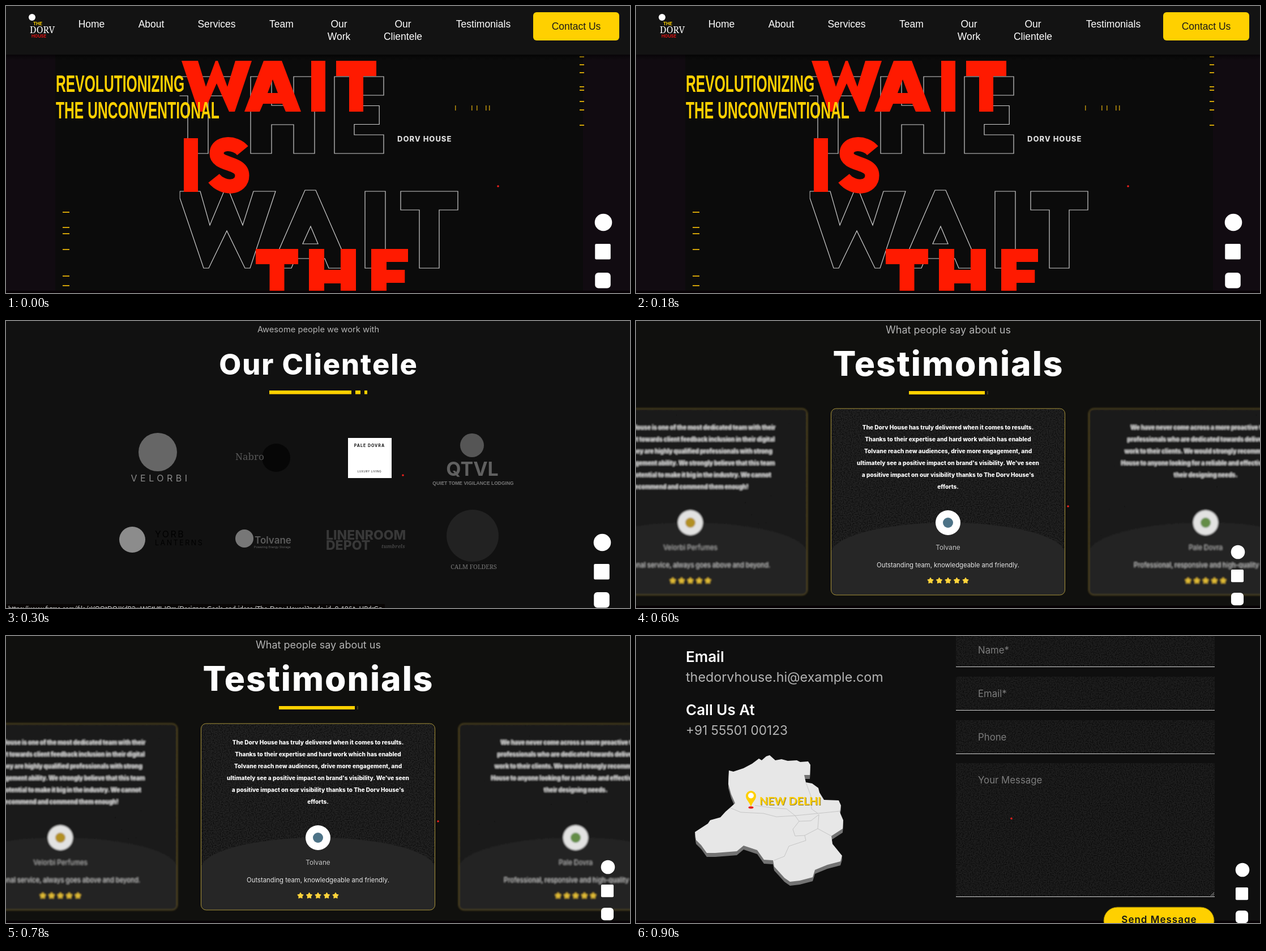
These frames come from a looping animation (1102x508 px, 1.2 s). An HTML page:

```html
<!DOCTYPE html>
<html lang="en">
<head>
<meta charset="utf-8">
<title>Agency website tour</title>
<style>
  html, body { margin: 0; width: 100%; height: 100%; overflow: hidden; background: #111; }
  svg { display: block; width: 100vw; height: 100vh; }
  text { font-family: Inter, "Open Sans", sans-serif; fill: #fff; white-space: pre; }
  .m { text-anchor: middle; }
  .sb { font-weight: 600; }
  .b { font-weight: 700; }
  .xb { font-weight: 800; }
  .arial { font-family: "Liberation Sans", Arial, sans-serif; }
  .serif { font-family: "Noto Serif", serif; }
  .lato { font-family: Lato, sans-serif; }
  .gold { fill: #ffd000; }
  .grey { fill: #b4b4b4; }
  .hint { fill: #7c7c7c; }
</style>
</head>
<body>
<svg id="stage" viewBox="0 0 1102 508" preserveAspectRatio="none"></svg>
<script>
const YELLOW = '#ffd000', RED = '#ff1a00';

const rect = (x, y, w, h, fill, more = '') =>
  `<rect x="${x}" y="${y}" width="${w}" height="${h}" fill="${fill}" ${more}/>`;
const circle = (x, y, r, fill) => `<circle cx="${x}" cy="${y}" r="${r}" fill="${fill}"/>`;
const text = (x, y, size, str, cls = '', more = '') =>
  `<text x="${x}" y="${y}" font-size="${size}" class="${cls}" ${more}>${str}</text>`;
const color = c => `style="fill:${c}"`;
const spaced = (px, c = '#fff') => `style="fill:${c};letter-spacing:${px}px"`;
const cursor = (x, y) => circle(x, y, 1.8, '#f0201c');
const page = fill => rect(0, 0, 1102, 508, fill);
const floor = () => rect(0, 504, 1102, 4, '#060004');

// Social buttons: one circle, two squares
const social = (x, y, r, a, b) => {
  const s = r * 1.8;
  return circle(x, y, r, '#fff') +
    [a, b].map((top, i) => rect(x - s / 2 - 1, top, s, s, '#fff', `rx="${2 + i * 4}"`)).join('');
};

// Block letters as path data
const barT = (x, y, w, h, bar, s) =>
  `M${x} ${y}h${w}v${bar}h${-(w - s) / 2}v${h - bar}h${-s}v${bar - h}h${-(w - s) / 2}z`;
const barI = (x, y, w, h) => `M${x} ${y}h${w}v${h}h${-w}z`;
const barH = (x, y, w, h, s, top, bottom) => {
  const gap = w - 2 * s;
  return `M${x} ${y}h${s}v${top}h${gap}v${-top}h${s}v${h}h${-s}v${bottom - h}h${-gap}v${h - bottom}h${-s}z`;
};
const barE = (x, y, w, h, s, bar) => {
  const gap = (h - 3 * bar) / 2, arm = w - s;
  return `M${x} ${y}h${w}v${bar}h${-arm}v${gap}h${arm * .85}v${bar}h${-arm * .85}v${gap}h${arm}v${bar}h${-w}z`;
};

function hero() {
  const nav = [[151, 'Home'], [256.5, 'About'], [372, 'Services'], [486.5, 'Team'],
    [588, 'Our', 'Work'], [701, 'Our', 'Clientele'], [843, 'Testimonials']];
  const outline = barT(275, 125, 128, 136, 34, 36) + barH(432, 125, 113, 136, 37, 51, 85) +
    barE(580, 125, 87, 136, 35, 33) +
    'M307 328H343L360 388 385 328H394L418 388 437 328H476L431 464H422L390 398 358 464H349L307 340z' +
    'M528 326H547L607 464H570L563 447H511L504 464H468zM538 390L551 421H524z' +
    barI(634, 328, 36, 136) + barT(697, 328, 101, 136, 33, 35);
  const solid = 'M310 97H339L353 143 370 97H374L391 143 405 97H434L404 187H394L372 137 350 187H340z' +
    'M455 97H487L521 187H494L488 173H454L448 187H421zM471 130L480 154H462z' +
    barI(539, 97, 25, 90) + barT(583, 97, 71, 90, 27, 25) + barI(314, 234, 25, 95) +
    barT(441, 430, 75, 95, 27, 26) + barH(535, 430, 83, 95, 27, 37, 61) + barE(645, 430, 65, 97, 27, 23);
  const ticks = (list, x, w) => list.map(y => rect(x, y - 1, w, 2, '#d0a208')).join('');
  return page('#110b11') + rect(87, 86, 932, 422, '#0b0b0b') +
    `<clipPath id="left"><rect x="306.5" y="90" width="700" height="418"/></clipPath>
     <path d="${outline}" fill="none" stroke="#cfcfcf" stroke-width="1.2" clip-path="url(#left)"/>
     <path d="${solid}" fill="${RED}" fill-rule="evenodd"/>
     <path d="M418 256C405 240 372 240 372 261C372 283 417 275 417 300C417 323 384 326 367 305"
       fill="none" stroke="${RED}" stroke-width="25"/>` +
    ticks([90, 104, 118, 143, 149, 169, 184, 211], 1013, 8) +
    ticks([365, 392, 403, 431, 478, 495], 100, 12) +
    [793, 822, 831, 847, 853].map(x => rect(x, 176, 1.5, 9, '#b8900c')).join('') +
    text(691, 240, 13, 'DORV HOUSE', 'xb', spaced(1, '#ddd')) +
    ['REVOLUTIONIZING', 'THE UNCONVENTIONAL'].map((s, i) =>
      text(0, 0, 42, s, 'arial b gold', `transform="translate(88 ${152 + i * 46.5}) scale(.587 1)"`)).join('') +
    rect(0, 84, 1102, 12, 'url(#shade)') + rect(0, 0, 1102, 86, '#131313') +
    circle(46, 20, 6, '#fff') + text(48, 34, 8, 'THE', 'b gold') +
    text(42, 48, 16, 'DORV', 'serif') + text(45, 56, 7.5, 'HOUSE', 'b', color('#e01010')) +
    nav.map(([x, ...lines]) => lines.map((s, i) =>
      text(x, 38 + i * 22, 17.5, s, 'arial m')).join('')).join('') +
    rect(931, 11, 152, 50, YELLOW, 'rx="6"') +
    text(1007, 42, 17.5, 'Contact Us', 'arial m', color('#1a1a1a')) +
    floor() + social(1055, 383, 15.3, 421, 472) + cursor(869, 319);
}

function clients() {
  return page('#111') +
    text(551.5, 20, 14.7, 'Awesome people we work with', 'm grey') +
    text(552, 94.5, 50.5, 'Our Clientele', 'xb m', spaced(2)) +
    rect(465, 123, 145, 6.5, YELLOW) + rect(617, 123, 9, 6.5, YELLOW) + rect(633, 123, 5, 6.5, YELLOW) +
    circle(268, 232, 34, '#666') + text(273, 284, 16, 'VELORBI', 'm', spaced(5.5, '#8a8a8a')) +
    circle(477, 242, 25, '#060606') + text(405, 246, 17, 'Nabro', 'serif', color('#555')) +
    rect(604, 207, 77, 71, '#fff') +
    text(642, 223, 7, 'PALE DOVRA', 'b m', spaced(1, '#111')) +
    text(642, 268, 4.6, 'LUXURY LIVING', 'm', spaced(.6, '#111')) +
    circle(823, 220, 21, '#555') + text(823.5, 274, 34, 'QTVL', 'b m', color('#606060')) +
    text(825, 290, 8.5, 'QUIET TOME VIGILANCE LODGING', 'arial b m', color('#777')) +
    circle(223, 387, 23, '#8c8c8c') +
    text(263, 383, 16, 'YORB', '', spaced(2.5, '#000')) +
    text(263, 397, 12.5, 'LANTERNS', '', spaced(2.5, '#000')) +
    circle(421, 385, 16, '#777') + text(439, 394, 17, 'Tolvane', 'sb', color('#5c5c5c')) +
    text(438, 402, 5.4, 'Powering Energy Storage', '', color('#666')) +
    text(565, 387, 23, 'LINENROOM', 'xb', color('#383838')) +
    text(565, 405, 23, 'DEPOT', 'xb', color('#383838')) +
    text(663, 402, 9, 'tumbrels', 'serif b', 'style="fill:#444;font-style:italic"') +
    circle(824, 380, 46, '#222') +
    text(826, 439, 10.7, 'CALM FOLDERS', 'serif m', color('#777')) +
    rect(0, 501, 669, 7, '#080504') +
    text(4, 513, 11.4, 'https://www.figma.com/file/aYOQtDOJKdR3wWGtVfLJQm/Designer-Goals-and-ideas-(The-Dorv-House)?node-id=0-10&amp;t=HRdrGq', 'lato', color('#ddd')) +
    social(1053, 392, 15.3, 430, 480) + cursor(701, 273);
}

const star = x => {
  let d = '';
  for (let i = 0; i < 10; i++) {
    const a = i * Math.PI / 5, r = i % 2 ? 2.9 : 5.2;
    d += `${x + r * Math.sin(a)},${459.8 - r * Math.cos(a)} `;
  }
  return `<polygon points="${d}" fill="#ffd43b" stroke="#ffd43b" stroke-width="1.2" stroke-linejoin="round"/>`;
};

function card(cx, lines, logo, name, quote, border, more = '') {
  const x = cx - 206.5;
  return `<g ${more}>` + rect(x, 155, 413, 330, '#232323', 'rx="9" filter="url(#leather)"') +
    `<path d="M${x} 412a206.5 55 0 0 1 413 0V476a9 9 0 0 1 -9 9H${x + 9}a9 9 0 0 1 -9 -9z" fill="#262626"/>` +
    rect(x, 155, 413, 330, 'none', `rx="9" stroke="${border}"`) +
    lines.map((s, i) => text(cx, 192 + i * 21, 10.1, s, 'xb m')).join('') +
    circle(cx, 357, 22, '#fff') + circle(cx, 357, 9, logo) +
    text(cx, 404.5, 11.7, name, 'm', color('#c4c4c4')) +
    text(cx, 435.5, 11.3, quote, 'm', color('#e6e6e6')) +
    [-31, -15.5, 0, 15.5, 31].map(d => star(cx + d)).join('') + '</g>';
}

function testimonials() {
  const away = ['#8a7428', 'filter="url(#soft)" opacity=".88"'];
  return page('#10100e') +
    text(551.5, 22, 18, 'What people say about us', 'm grey') +
    text(551.5, 97, 60.5, 'Testimonials', 'xb m', spaced(2)) +
    rect(482, 124, 134, 6, YELLOW) + rect(620.5, 124, 1, 6, '#776a2a') +
    card(96, ['The Dorv House is one of the most dedicated team with their',
      'great effort towards client feedback inclusion in their digital',
      'media. They are highly qualified professionals with strong',
      'time management ability. We strongly believe that this team',
      'has the potential to make it big in the industry. We cannot',
      'recommend and commend them enough!'],
      '#c9a227', 'Velorbi Perfumes', 'Exceptional service, always goes above and beyond.', ...away) +
    card(1006, ['We have never come across a more proactive team of',
      'professionals who are dedicated towards delivering top',
      'work to their clients. We would strongly recommend Dorv',
      'House to anyone looking for a reliable and effective team for',
      'their designing needs.'],
      '#6f9f4f', 'Pale Dovra', 'Professional, responsive and high-quality work.', ...away) +
    card(551, ['The Dorv House has truly delivered when it comes to results.',
      'Thanks to their expertise and hard work which has enabled',
      'Tolvane reach new audiences, drive more engagement, and',
      "ultimately see a positive impact on brand's visibility. We've seen",
      "a positive impact on our visibility thanks to The Dorv House's",
      'efforts.'],
      '#4d7387', 'Tolvane', 'Outstanding team, knowledgeable and friendly.', '#a8933a') +
    floor() + social(1063, 409, 12.3, 440, 481) + cursor(763, 328);
}

function contact() {
  const land = 'M164 238L172 240 190 234 205 226 217 217 222 220 230 213 236 211 246 220 257 218 268 221 ' +
    '284 220 290 223 304 222 308 228 307 246 297 246 300 259 311 261 322 269 324 277 332 290 358 291 362 300 ' +
    '360 312 366 326 365 341 345 354 347 368 364 389 361 399 338 405 316 414 312 427 289 433 272 435 262 428 ' +
    '244 408 242 397 226 396 214 379 190 371 178 381 140 384 125 384 115 370 106 361 104 347 127 332 131 326 ' +
    '149 321 158 311 166 304 175 296 168 280 163 262z';
  const fields = [[-5, 60, 'Name*'], [72, 60, 'Email*'], [149, 60, 'Phone'], [225, 237, 'Your Message']];
  return page('#0f0f0f') +
    text(88, 46, 26, 'Email', 'sb') + text(88, 81, 23.3, 'thedorvhouse.hi@example.com', 'grey') +
    text(88, 140, 26, 'Call Us At', 'sb') + text(88, 175, 22.6, '+91 55501 00123', 'grey') +
    [7, 5, 3].map(y => `<path d="${land}" transform="translate(0 ${y})" fill="#737373"/>`).join('') +
    `<path d="${land}" fill="#e7e7e7"/>
     <path d="M166 304L185 312 225 314 248 320 281 318 321 314 360 310M210 300L240 304 266 306 281 318
       288 328 277 342 281 354 298 353 300 362 270 372 262 390 244 397M288 328L309 327 323 316 321 341 298 353
       M321 341L345 354M300 259L309 284 310 306 321 314" fill="none" stroke="#bdbdbd" stroke-width=".8"/>
     <ellipse cx="203" cy="303.5" rx="4.5" ry="2" fill="#e81c1c"/>
     <path d="M203 302C200 293 194 290 194 283a9 9 0 0 1 18 0C212 290 206 293 203 302z" fill="${YELLOW}"/>` +
    circle(203, 282.5, 5, '#fff') +
    text(219, 299.5, 19.6, 'NEW DELHI', 'lato b', color('#8a7a3a')) +
    text(218, 298.5, 19.6, 'NEW DELHI', 'lato b gold') +
    fields.map(([y, h, label]) => rect(565, y, 457, h, '#1f1f1f', 'filter="url(#leather)"') +
      rect(565, y + h - 1, 457, 1, '#cfcfcf') +
      text(604, Math.max(y, -4.5) + 35.5, 16.8, label, 'hint')).join('') +
    '<path d="M1015 460l6 -6M1018 460l3 -3" stroke="#aaa"/>' + floor() +
    rect(826, 480, 195, 48, YELLOW, 'rx="24" stroke="#8a7200"') +
    text(924, 508, 17, 'Send Message', 'sb m', spaced(1, '#161616')) +
    social(1071, 414, 12.3, 445, 486) + cursor(663, 323);
}

const defs = `<defs>
  <linearGradient id="shade" x2="0" y2="1"><stop stop-color="#000" stop-opacity=".6"/><stop offset="1" stop-color="#000" stop-opacity="0"/></linearGradient>
  <filter id="soft"><feGaussianBlur stdDeviation="1.7"/></filter>
  <filter id="leather" x="0" y="0" width="100%" height="100%" color-interpolation-filters="sRGB">
    <feTurbulence type="fractalNoise" baseFrequency=".5" numOctaves="1" seed="4"/>
    <feColorMatrix values="0 0 0 0 0 0 0 0 0 0 0 0 0 0 0 1.6 0 0 0 -.6"/>
    <feComposite in2="SourceGraphic" operator="in" result="grain"/>
    <feMerge><feMergeNode in="SourceGraphic"/><feMergeNode in="grain"/></feMerge>
  </filter></defs>`;

const stage = document.getElementById('stage');
stage.innerHTML = defs + [hero, clients, testimonials, contact].map(f => `<g class="scene">${f()}</g>`).join('');
const scenes = [...stage.querySelectorAll('.scene')];
const HOLD = 300;
let shown = -1;

function play() {
  const now = Math.floor(performance.now() / HOLD) % scenes.length;
  if (now !== shown) {
    scenes.forEach((s, i) => s.style.display = i === now ? '' : 'none');
    shown = now;
  }
  requestAnimationFrame(play);
}
play();
</script>
</body>
</html>
```
